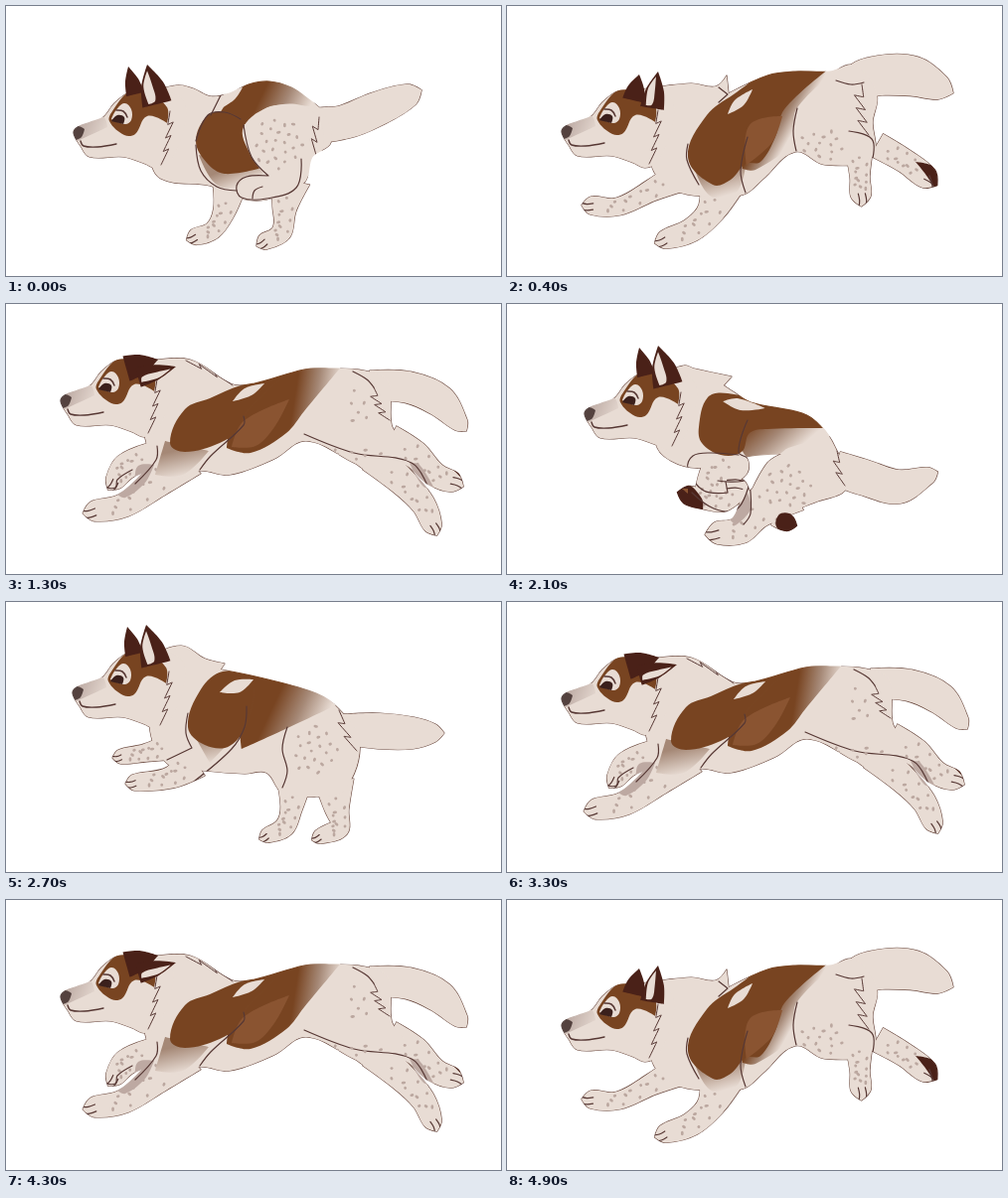
Write an HTML page with a canvas that moves like this. It is 498 px wide and 272 px high and loops after 5000 ms.

```html
<!DOCTYPE html>
<html lang="en">
<head>
<meta charset="utf-8">
<title>Running dog</title>
<style>
html, body { margin: 0; width: 100%; height: 100%; overflow: hidden; background: #fff; }
canvas { display: block; }
</style>
</head>
<body>
<canvas id="stage" width="498" height="272"></canvas>
<script>
const canvas = document.getElementById('stage');
const ctx = canvas.getContext('2d');
const CREAM = '#e8dcd4', BROWN = '#784421', LIGHT = '#8a5431', EAR = '#4a2118';
const TAN = '#a58876', GREY = '#bda9a2', INK = '#563733', SPOT = '#bba79f';

const group = (flat, n) => Array.from({ length: flat.length / n }, (_, i) => flat.slice(i * n, i * n + n));

// Smooth curve through points; sharp turns stay corners.
function smooth(p, closed) {
  const n = p.length;
  const at = i => closed ? p[(i + n) % n] : p[Math.max(0, Math.min(n - 1, i))];
  const tangent = i => {
    const [a, b, c] = [at(i - 1), at(i), at(i + 1)];
    const ux = b[0] - a[0], uy = b[1] - a[1], vx = c[0] - b[0], vy = c[1] - b[1];
    const cos = (ux * vx + uy * vy) / (Math.hypot(ux, uy) * Math.hypot(vx, vy) || 1);
    const len = Math.hypot(ux + vx, uy + vy);
    return cos < 0.1 || !len ? [0, 0] : [(ux + vx) / len, (uy + vy) / len];
  };
  const path = new Path2D();
  path.moveTo(...p[0]);
  for (let i = 0; i < (closed ? n : n - 1); i++) {
    const a = at(i), b = at(i + 1), s = tangent(i), e = tangent(i + 1);
    const k = Math.hypot(b[0] - a[0], b[1] - a[1]) * 0.34;
    path.bezierCurveTo(a[0] + s[0] * k, a[1] + s[1] * k, b[0] - e[0] * k, b[1] - e[1] * k, ...b);
  }
  return path;
}

// Direction of a limb at joint i.
function heading(joints, i) {
  const a = joints[Math.max(0, i - 1)], b = joints[Math.min(joints.length - 1, i + 1)];
  const len = Math.hypot(b[0] - a[0], b[1] - a[1]);
  return [(b[0] - a[0]) / len, (b[1] - a[1]) / len];
}

// Tapered limb from joints of x, y, radius.
function limbPath(joints) {
  const side = s => joints.map(([x, y, r], i) => {
    const [dx, dy] = heading(joints, i);
    return [x - dy * r * s, y + dx * r * s];
  });
  const last = joints.length - 1, [x, y, r] = joints[last], [dx, dy] = heading(joints, last);
  return smooth([...side(1), [x + dx * r, y + dy * r], ...side(-1).reverse()], true);
}

function fill(color, pts) {
  ctx.fillStyle = color;
  ctx.fill(smooth(group(pts, 2), true));
}

function line(pts, width = 1.2) {
  ctx.strokeStyle = INK;
  ctx.lineWidth = width;
  ctx.stroke(smooth(group(pts, 2)));
}

function fade(x1, y1, x2, y2, ...colors) {
  const g = ctx.createLinearGradient(x1, y1, x2, y2);
  colors.forEach((c, i) => g.addColorStop(i / (colors.length - 1), c));
  return g;
}

function dot(x, y, i) {
  ctx.fillStyle = SPOT;
  ctx.beginPath();
  ctx.ellipse(x, y, 1.5 + i % 4 * 0.25, 1.4, i, 0, 7);
  ctx.fill();
}

function spots(cx, cy, rx, ry, n) {
  for (let i = 0; i < n; i++) {
    const r = Math.sqrt((i + 0.5) / n), a = i * 2.4 + cx;
    dot(cx + Math.cos(a) * r * rx, cy + Math.sin(a) * r * ry, i);
  }
}

function legMarks(joints) {
  const last = joints.length - 1;
  for (let i = 0; i < 12; i++) {
    const t = (0.2 + i * 0.055) * last, k = Math.floor(t), u = t - k;
    const [x, y, r] = joints[k].map((v, j) => v + (joints[k + 1][j] - v) * u);
    const [dx, dy] = heading(joints, k), off = Math.sin(i * 2.2) * r * 0.65;
    dot(x - dy * off, y + dx * off, i);
  }
  const [x, y, r] = joints[last], [dx, dy] = heading(joints, last);
  for (const s of [-0.45, 0.25]) {
    const px = x - dy * r * s, py = y + dx * r * s;
    line([px - dx * r * 0.3, py - dy * r * 0.3, px + dx * r * 0.4 + dy, py + dy * r * 0.4 - dx,
      px + dx * r, py + dy * r]);
  }
}

// Zigzag fur between two points.
function fur(x1, y1, x2, y2, n, depth) {
  const dx = x2 - x1, dy = y2 - y1, len = Math.hypot(dx, dy), pts = [x1, y1];
  for (let i = 1; i <= n; i++) {
    const t = i / n, b = t - 0.25 / n;
    pts.push(x1 + dx * t, y1 + dy * t);
    if (i < n) pts.push(x1 + dx * b + dy / len * depth, y1 + dy * b - dx / len * depth);
  }
  line(pts, 1);
}

const HEAD = [0,0, 4,-6, 17,-11, 30,-16, 41,-30, 56,-41, 72,-42, 95,-42, 112,-30, 110,0,
  96,30, 84,36, 72,31, 50,24, 16,24, 7,13];

// Silhouette; later markings stay inside it.
function body(nose, torso, tail, ...legs) {
  const limbs = legs.map(l => group(l, 3));
  const head = HEAD.map((v, i) => v + nose[i % 2]);
  const parts = [limbPath(group(tail, 3)), ...limbs.map(limbPath),
    ...[torso, head].map(p => smooth(group(p, 2), true))];
  ctx.strokeStyle = '#6d4c42';
  ctx.lineWidth = 1.2;
  parts.forEach(p => ctx.stroke(p));
  ctx.fillStyle = CREAM;
  parts.forEach(p => ctx.fill(p));
  ctx.globalCompositeOperation = 'source-atop';
  limbs.forEach(legMarks);
}

function ear(bx, by, tx, ty, w, inner) {
  const len = Math.hypot(tx - bx, ty - by), nx = (by - ty) / len * w, ny = (tx - bx) / len * w;
  const mx = (bx + tx) / 2, my = (by + ty) / 2;
  fill(EAR, [bx + nx, by + ny, mx + nx * 0.75, my + ny * 0.75, tx, ty,
    mx - nx * 0.75, my - ny * 0.75, bx - nx, by - ny]);
  if (!inner) return;
  const at = (s, t) => [bx + (tx - bx) * t + nx * s * inner, by + (ty - by) * t + ny * s * inner];
  fill(CREAM, [...at(0.55, 0.05), ...at(0.6, 0.5), ...at(0.1, 0.85), ...at(0, 0.45), ...at(0.05, 0.1)]);
}

function face([x, y], ...ears) {
  ctx.save();
  ctx.translate(x, y);
  fill(fade(0, -6, 34, 8, '#b8a59e', CREAM), [0,-4, 14,-12, 30,-16, 34,-6, 4,8]);
  fill(BROWN, [36,-12, 39,-22, 56,-42, 72,-43, 94,-26, 94,-10, 74,-17, 62,1, 51,2]);
  fill(CREAM, [38,-14, 42,-22, 51,-30, 58,-24, 58,-13, 52,-9]);
  fill('#3b201c', [38,-12, 44,-18, 51,-16, 50,-9]);
  line([43,-23, 50,-22, 54,-16], 1.5);
  fill('#54423f', [-1,-1, 4,-7, 11,-4, 8,4, 2,7]);
  line([7,8, 10,13, 24,14, 43,11], 1.4);
  fur(97, -22, 88, 32, 4, 5);
  ctx.globalCompositeOperation = 'source-over';
  ears.forEach(e => ear(...e));
  ctx.restore();
}

const UPRIGHT = [[62, -39, 55, -67, 9], [84, -29, 74, -69, 15, -1]];
const LEANING = [[72, -32, 78, -58, 11], [91, -24, 97, -61, 12, -1]];
const FLAT = [[66, -33, 98, -42, 13], [78, -24, 116, -35, 10, 1]];

function landed() {
  const nose = [68, 128];
  body(nose, [150,90, 171,80, 188,83, 206,91, 225,88, 244,79, 265,76, 287,82, 303,93, 320,108,
    327,137, 308,152, 300,178, 262,195, 236,194, 205,181, 156,174, 145,150],
    [308,120,13, 340,117,17, 375,103,17, 408,89,11],
    [224,185,16, 219,208,11, 208,226,9, 189,233,8],
    [286,176,20, 280,205,12, 277,228,10, 259,238,8]);
  fill(fade(222, 164, 230, 184, TAN, CREAM), [194,150, 212,180, 240,182, 262,165]);
  fill(fade(262, 80, 306, 101, BROWN, TAN, CREAM), [212,113, 232,86, 260,72, 290,75, 313,102, 266,101, 238,120]);
  fill(BROWN, [191,136, 203,110, 220,107, 238,116, 244,144, 257,163, 220,169, 202,158]);
  fill(CREAM, [205,109, 218,90, 238,82, 229,95]);
  fill(CREAM, [239,122, 268,101, 306,104, 320,135, 298,178, 262,195, 234,190, 238,174, 261,171, 245,148]);
  line([206,110, 214,94, 217,88]);
  line([191,136, 203,110, 220,107, 236,114]);
  line([239,120, 247,152, 264,171, 242,172, 232,181, 237,193, 262,194, 292,183, 297,154]);
  line([248,194, 250,186, 258,182]);
  line([191,140, 196,166, 212,182, 232,186]);
  fur(315, 112, 312, 150, 3, -6);
  spots(274, 138, 25, 28, 24);
  face(nose, ...UPRIGHT);
}

function gathered() {
  const nose = [78, 111];
  body(nose, [160,72, 178,62, 188,65, 226,73, 218,82, 227,88, 245,99, 297,110, 315,122, 330,144,
    343,183, 312,199, 275,208, 246,188, 262,160, 276,151, 246,153, 195,165, 165,158, 150,140],
    [330,165,17, 360,175,18, 395,184,17, 426,172,8],
    [240,162,9, 212,166,17, 200,182,14, 225,183,12],
    [240,183,8, 218,198,11, 195,196,10, 180,192,9],
    [288,188,22, 250,208,19, 234,228,14, 210,231,11],
    [268,216,7, 284,221,8]);
  fill(fade(255, 112, 288, 150, BROWN, TAN, CREAM), [233,106, 300,104, 330,132, 283,145, 272,152, 240,153]);
  fill(BROWN, [193,124, 202,94, 222,90, 297,108, 318,125, 262,126, 244,130, 236,149, 215,152, 196,140]);
  fill(CREAM, [217,98, 232,95, 260,105, 235,107]);
  fill(GREY, [217,210, 231,205, 242,190, 245,207, 230,223]);
  fill(EAR, [168,182, 180,180, 196,196, 197,208, 176,204]);
  fill(LIGHT, [176,186, 182,186, 182,191]);
  fill(EAR, [273,213, 284,211, 293,219, 288,231, 272,226]);
  line([242,117, 233,149, 244,157, 243,176, 212,178]);
  line([233,152, 205,150, 187,153, 182,166, 198,188, 222,190, 220,179]);
  line([186,190, 208,206, 231,207, 244,180, 245,211, 238,222]);
  fur(332, 148, 340, 183, 3, -6);
  spots(282, 184, 26, 22, 20);
  face(nose, ...UPRIGHT);
}

function pushOff() {
  const nose = [67, 92];
  body(nose, [150,58, 176,44, 200,57, 220,62, 216,68, 255,76, 312,92, 335,108, 356,140, 340,190,
    312,196, 278,192, 262,172, 240,173, 200,170, 165,165, 145,130],
    [338,128,15, 375,130,18, 410,132,16, 432,132,9],
    [190,160,18, 165,177,11, 128,182,8],
    [168,145,14, 140,152,9, 114,156,7],
    [330,180,20, 333,210,12, 335,228,10, 314,237,7],
    [290,180,18, 287,208,11, 280,227,10, 261,236,7]);
  fill(fade(245, 92, 318, 126, BROWN, BROWN, TAN, CREAM), [228,66, 300,82, 332,104, 279,129, 237,148]);
  fill(fade(210, 134, 217, 160, TAN, CREAM), [183,123, 205,162, 240,125]);
  fill(BROWN, [183,126, 196,88, 218,70, 246,77, 244,118, 225,145, 200,144]);
  fill(CREAM, [215,91, 230,79, 249,78, 235,91]);
  line([242,105, 240,126, 227,148, 190,180]);
  line([183,112, 181,132, 187,147, 162,159]);
  line([283,126, 278,148, 283,170, 278,187]);
  fur(335, 109, 353, 150, 3, -6);
  spots(311, 150, 24, 25, 20);
  face(nose, ...UPRIGHT);
}

function stretched() {
  const nose = [55, 98];
  body(nose, [140,58, 185,56, 228,81, 250,80, 300,66, 325,65, 360,67, 384,78, 388,122, 400,145,
    375,172, 350,160, 302,138, 270,156, 225,172, 196,168, 165,175, 140,135],
    [365,82,15, 405,84,16, 437,98,16, 458,122,8],
    [180,153,24, 150,180,16, 118,203,12, 87,209,10],
    [148,152,13, 120,164,13, 108,180,9],
    [370,154,17, 400,180,14, 420,202,12, 430,225,9],
    [385,138,17, 412,152,14, 432,172,12, 451,180,10]);
  fill(GREY, [112,192, 128,178, 133,163, 149,162, 140,180, 120,195]);
  fill(GREY, [406,160, 416,162, 431,186, 420,184]);
  fill(fade(178, 146, 184, 172, TAN, CREAM), [160,138, 150,172, 178,172, 204,148]);
  fill(fade(270, 85, 334, 95, BROWN, BROWN, TAN, CREAM), [238,82, 275,66, 340,60, 300,108, 282,130, 246,150, 222,145]);
  fill(BROWN, [165,140, 180,106, 205,95, 236,82, 281,71, 242,109, 235,126, 215,140, 180,149]);
  fill(LIGHT, [239,118, 285,96, 270,124, 251,143, 227,144]);
  fill(CREAM, [228,98, 240,85, 260,80, 247,92]);
  line([195,167, 206,153, 239,122, 239,113]);
  line([152,143, 151,157, 130,181]);
  line([97,184, 110,185, 112,177, 127,167]);
  line([300,131, 350,150, 408,160, 426,188]);
  line([349,68, 363,76, 370,84]);
  fur(370, 84, 386, 117, 4, -7);
  fur(181, 57, 228, 82, 3, 3);
  fill(EAR, [447,164, 456,167, 457,174]);
  spots(353, 104, 12, 20, 6);
  spots(350, 151, 30, 7, 8);
  face(nose, ...FLAT);
}

function reaching() {
  const nose = [55, 127];
  body(nose, [135,84, 185,78, 210,81, 221,70, 223,88, 262,70, 290,66, 325,66, 350,60, 372,89,
    368,116, 367,152, 320,160, 290,147, 258,174, 238,190, 200,192, 165,184, 145,160],
    [345,78,14, 375,70,20, 410,71,20, 438,83,12],
    [215,178,24, 205,207,14, 185,226,12, 157,236,9],
    [175,171,16, 145,186,11, 112,202,9, 84,201,9],
    [354,140,15, 355,172,10, 356,192,10],
    [372,140,13, 400,156,12, 424,174,11]);
  fill(fade(210, 167, 217, 192, TAN, CREAM), [185,153, 204,191, 230,189, 241,155]);
  fill(fade(277, 92, 300, 105, BROWN, TAN, CREAM), [241,82, 270,62, 335,62, 291,104, 287,137, 250,165, 237,164]);
  fill(BROWN, [182,152, 201,110, 228,89, 258,71, 323,64, 279,104, 270,132, 255,157, 240,159, 225,175, 207,180]);
  fill(LIGHT, [244,120, 277,111, 267,137, 241,160]);
  fill(CREAM, [222,109, 229,95, 247,84, 238,100]);
  line([242,132, 235,166, 240,188]);
  line([182,139, 181,155, 193,180]);
  line([292,103, 288,126, 291,146]);
  line([331,75, 346,79, 359,77]);
  fur(357, 79, 364, 130, 4, -9);
  line([344,126, 367,134, 368,153]);
  line([213,82, 222,89, 213,97]);
  fill(EAR, [411,157, 431,162, 438,174, 433,187, 420,168]);
  line([425,171, 429,184], 1.5);
  spots(318, 140, 24, 16, 14);
  face(nose, ...LEANING);
}

const poses = [landed, gathered, pushOff, stretched, reaching];
const STEP = 100;
const start = performance.now();
ctx.lineCap = ctx.lineJoin = 'round';

function draw() {
  const i = Math.floor((performance.now() - start) / STEP) % poses.length;
  ctx.clearRect(0, 0, canvas.width, canvas.height);
  ctx.save();
  poses[i]();
  ctx.restore();
  requestAnimationFrame(draw);
}
draw();
</script>
</body>
</html>
```
